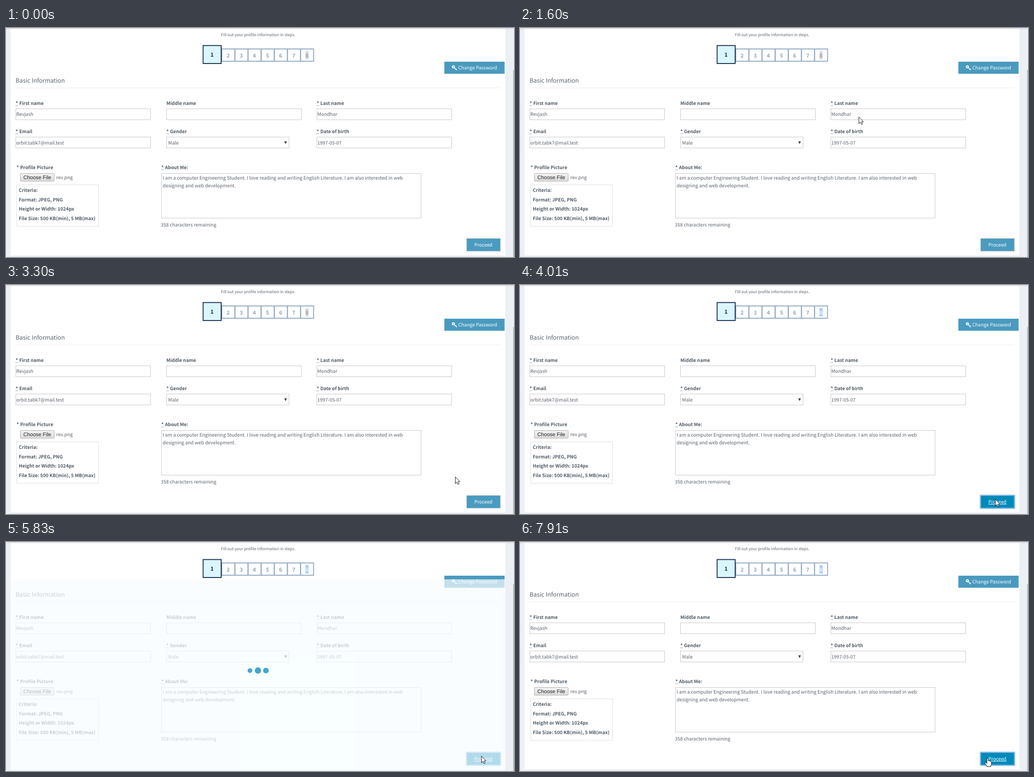
An HTML page that plays this animation: 1112 by 503 pixels, repeating every 8 s.

```html
<!DOCTYPE html>
<html lang="en">
<head>
<meta charset="utf-8">
<title>Profile form</title>
<style>
html, body { margin: 0; width: 100%; height: 100%; overflow: hidden; background: #ecf0f5; }
svg { display: block; width: 1112px; height: 503px; }
text {
  font: 10.33px "Noto Sans CJK JP", "Noto Sans CJK SC", "Noto Sans CJK", "Open Sans", sans-serif;
  fill: #5a626b; text-rendering: geometricPrecision; white-space: pre;
}
text.b { font-size: 10.25px; font-weight: 700; fill: #4f5b67; }
text.mid { text-anchor: middle; }
.field { fill: #fff; stroke: #c4c6c9; }
</style>
</head>
<body>
<svg viewBox="0 0 1112 503" xmlns="http://www.w3.org/2000/svg">
  <defs>
    <linearGradient id="grey" x2="0" y2="1"><stop stop-color="#f3f3f3"/><stop offset="1" stop-color="#dcdcdc"/></linearGradient>
    <filter id="blur" x="0" y="0" width="1112" height="503" filterUnits="userSpaceOnUse"><feGaussianBlur stdDeviation=".6"/></filter>
  </defs>
  <rect width="1112" height="503" fill="#ecf0f5"/>
  <path d="M10 0H1093V497q0 4-4 4H14q-4 0-4-4Z" fill="#fff"/>
  <path d="M12 500.5H1091" stroke="#dfe4ea"/>
  <rect x="1109" width="3" height="503" fill="#f1f1f1"/>
  <rect x="1110" y="92" width="2" height="411" fill="#b9bcc1"/>
  <rect width="1112" height="1" fill="#f4f5f6"/>
  <path d="M0 1.5H1112" stroke="#c6c9cd"/>
  <g id="steps"></g>
  <g id="form"></g>
  <g id="password">
    <rect x="959.5" y="74" width="132" height="26.5" fill="#4a9abf"/>
    <g fill="none" stroke="#fff"><circle cx="979.3" cy="85.3" r="2.3" stroke-width="2"/>
    <path d="M981 87L986.5 92.5M983.3 90.5l1.8-1.8M985.2 92.4l1.8-1.8" stroke-width="1.6"/></g>
  </g>
  <g id="veil">
    <path d="M10 82H1093V499q0 4-4 4H14q-4 0-4-4Z" fill="#f7fdff" fill-opacity=".865"/>
    <g id="dots" fill="#1f92c2"></g>
  </g>
  <g id="pointer" fill="#fff" stroke="#111" stroke-linejoin="round">
    <path id="arrow" d="M0 0V14.5L3.3 11.5L5.6 16.5L8 15.4L5.7 10.6H10Z"/>
    <path id="hand" d="M-2 1.5Q-2 0-.5 0T1 1.5V6Q2.5 5 3.5 6.5Q5 5.8 5.7 7.3Q8 7 8 9V13Q8 15 6.5 16.5V19H-2V17.5L-6 12Q-7 10-5.5 9.5T-3 11L-2 12Z"/>
  </g>
</svg>
<script>
const LOOP = 8000, CLICK = 4010;
const $ = id => document.getElementById(id);

function add(parent, tag, attrs, content = '') {
  const el = document.createElementNS('http://www.w3.org/2000/svg', tag);
  for (const k in attrs) el.setAttribute(k, attrs[k]);
  el.textContent = content;
  parent.append(el);
  return el;
}
const text = (parent, x, y, s, cls = '', style = '') => add(parent, 'text', { x, y, class: cls, style }, s);
const form = $('form'), steps = $('steps');
const field = (x, y, width, height) => add(form, 'rect', { x: x + .5, y: y + .5, width, height, class: 'field' });

function label(x, y, s, star = true, dotted = star) {
  if (star) text(form, x, y, '*', 'b');
  if (dotted) add(form, 'path', { d: `M${x} ${y + 1.5}h6`, stroke: '#4f5b67', 'stroke-dasharray': '1 1' });
  text(form, star ? x + 8 : x, y, s, 'b');
}

// Step bar
text(steps, 552, 18, 'Fill out your profile information in steps.', 'mid', 'font-size:8.76px');
let mark, eight;
for (let n = 2; n <= 8; n++) {
  const x = 472.5 + (n - 2) * 28.75;
  add(steps, 'rect', { x, y: 46, width: 28.3, height: 27, fill: '#fff', stroke: '#93a9c4', 'stroke-width': 2 });
  if (n === 8) mark = add(steps, 'rect', { x: 655.5, y: 51, width: 7, height: 18 });
  eight = text(steps, x + 13.8, 65, n, 'b mid', 'font-size:11.7px;fill:#93a5bd');
}
add(steps, 'rect', { x: 431.5, y: 38.5, width: 39.5, height: 39.5, fill: '#dbf5fe', stroke: '#1c3350', 'stroke-width': 2 });
text(steps, 451, 63, '1', 'b mid', 'font-size:12px;fill:#1c2b3c');

// Form
text(form, 21, 120, 'Basic Information', '', 'font-size:13.05px');
add(form, 'path', { d: 'M21 131.5H1083', stroke: '#ececec' });
text($('password'), 990, 91, 'Change Password', '', 'fill:#fff');

[[21, 'First name', 'Revjash'], [351, 'Middle name', ''], [680, 'Last name', 'Mondhar']].forEach(([x, name, value]) => {
  label(x, 169, name, x !== 351);
  field(x, 177, 295, 24);
  text(form, x + 1.5, 193, value);
});
[[21, 'Email', 'orbit.tabk7@mail.test', 295], [351, 'Gender', 'Male', 268], [680, 'Date of birth', '1997-05-07', 295]].forEach(([x, name, value, w]) => {
  label(x, 231, name);
  field(x, 239, w, 24);
  text(form, x === 351 ? 355 : x + 1.5, 256, value);
});
add(form, 'path', { d: 'M609 249h6l-3 6Z', fill: '#444' });

label(23, 310, 'Profile Picture', true, false);
add(form, 'rect', { x: 31.5, y: 319.5, width: 74, height: 17, rx: 1, fill: 'url(#grey)', stroke: '#adadad' });
text(form, 38, 332, 'Choose File', '', 'font:11.43px "Liberation Sans",sans-serif;fill:#222');
text(form, 110, 332, 'rev.png');
field(23, 344, 179, 91).style.stroke = '#dedede';
['Criteria:', 'Format: JPEG, PNG', 'Height or Width: 1024px', 'File Size: 500 KB(min), 5 MB(max)']
  .forEach((s, i) => text(form, 28, 360 + i * 20.7, s, 'b'));

label(340, 310, 'About Me:');
field(340, 319, 568, 98);
text(form, 343, 333, 'I am a computer Engineering Student. I love reading and writing English Literature. I am also interested in web');
text(form, 343, 350, 'designing and web development.');
text(form, 339, 436, '358 characters remaining');

const ring = add(form, 'rect', { x: 1007.5, y: 461.5, width: 75.5, height: 29.5, rx: 1, fill: 'none', stroke: '#6aa3e6', 'stroke-width': 1.6 });
const button = add(form, 'rect', { x: 1008.5, y: 462.5, width: 73.5, height: 27.5 });
const caption = text(form, 1045, 480, 'Proceed', 'mid', 'fill:#fff;font-weight:500');

const dots = [534, 551.5, 569].map(cx => add($('dots'), 'circle', { cx, cy: 282.3 }));

// Pointer route: time, x, y
const route = [
  [70, 1032, 499], [270, 1040, 478], [880, 1040, 478], [960, 1040, 475], [1210, 916, 289],
  [1350, 916, 289], [1420, 870, 255], [1660, 700, 176], [1900, 616, 196], [2060, 616, 196],
  [2140, 540, 194], [2300, 310, 204], [2380, 301, 214], [2670, 623, 271], [2770, 623, 271],
  [2840, 700, 298], [2980, 920, 371], [3070, 920, 371], [3140, 950, 392], [3500, 1025, 458],
  [3920, 1040.5, 470.5], [7090, 1041, 470], [7170, 1034, 474], [7520, 829, 490],
  [7910, 1024, 474.5], [8000, 1024, 474.5]
];

function locate(t) {
  const i = route.findIndex(p => p[0] > t);
  if (i < 1) return null;
  const [a, b] = [route[i - 1], route[i]];
  const k = (t - a[0]) / (b[0] - a[0]);
  return [a[1] + (b[1] - a[1]) * k, a[2] + (b[2] - a[2]) * k];
}

const clamp = v => Math.max(0, Math.min(1, v));
const swing = v => (1 - Math.cos(Math.PI * clamp(v))) / 2;
const show = (el, on) => el.setAttribute('visibility', on ? 'visible' : 'hidden');

// Grows until 40% of the cycle, shrinks until 80%, then rests
function bounce(ms) {
  const p = (ms / 1400 % 1 + 1) % 1;
  return p < .4 ? swing(p / .4) : 1 - swing((p - .4) / .4);
}

function render(t) {
  const focus = t >= CLICK;
  const at = locate(t);
  const over = at && at[0] > 1007 && at[0] < 1083 && at[1] > 461 && at[1] < 491;
  const hand = over && !(t >= CLICK && t < 6340);

  if (at) $('pointer').setAttribute('transform', `translate(${at[0].toFixed(2)} ${at[1].toFixed(2)})`);
  show($('arrow'), at && !hand);
  show($('hand'), hand);

  mark.setAttribute('fill', focus ? '#a6cbfa' : '#dadada');
  eight.style.fill = focus ? '#eaf3ff' : '#a0a4ad';
  show(ring, focus);
  button.setAttribute('fill', over || focus ? '#028abb' : '#4a9bc0');
  button.setAttribute('stroke', focus ? '#b4cfe6' : '#a3afb6');
  caption.style.textDecoration = focus ? 'underline' : 'none';

  const veil = swing((t - 4080) / 640) * (1 - swing((t - 5640) / 700));
  $('veil').setAttribute('opacity', veil);
  if (veil > .02) form.setAttribute('filter', 'url(#blur)');
  else form.removeAttribute('filter');
  dots.forEach((d, i) => d.setAttribute('r', 7 * bounce(t - 4670 + 992 - i * 160)));
}

function tick() {
  render(performance.now() % LOOP);
  requestAnimationFrame(tick);
}
tick();
</script>
</body>
</html>
```
